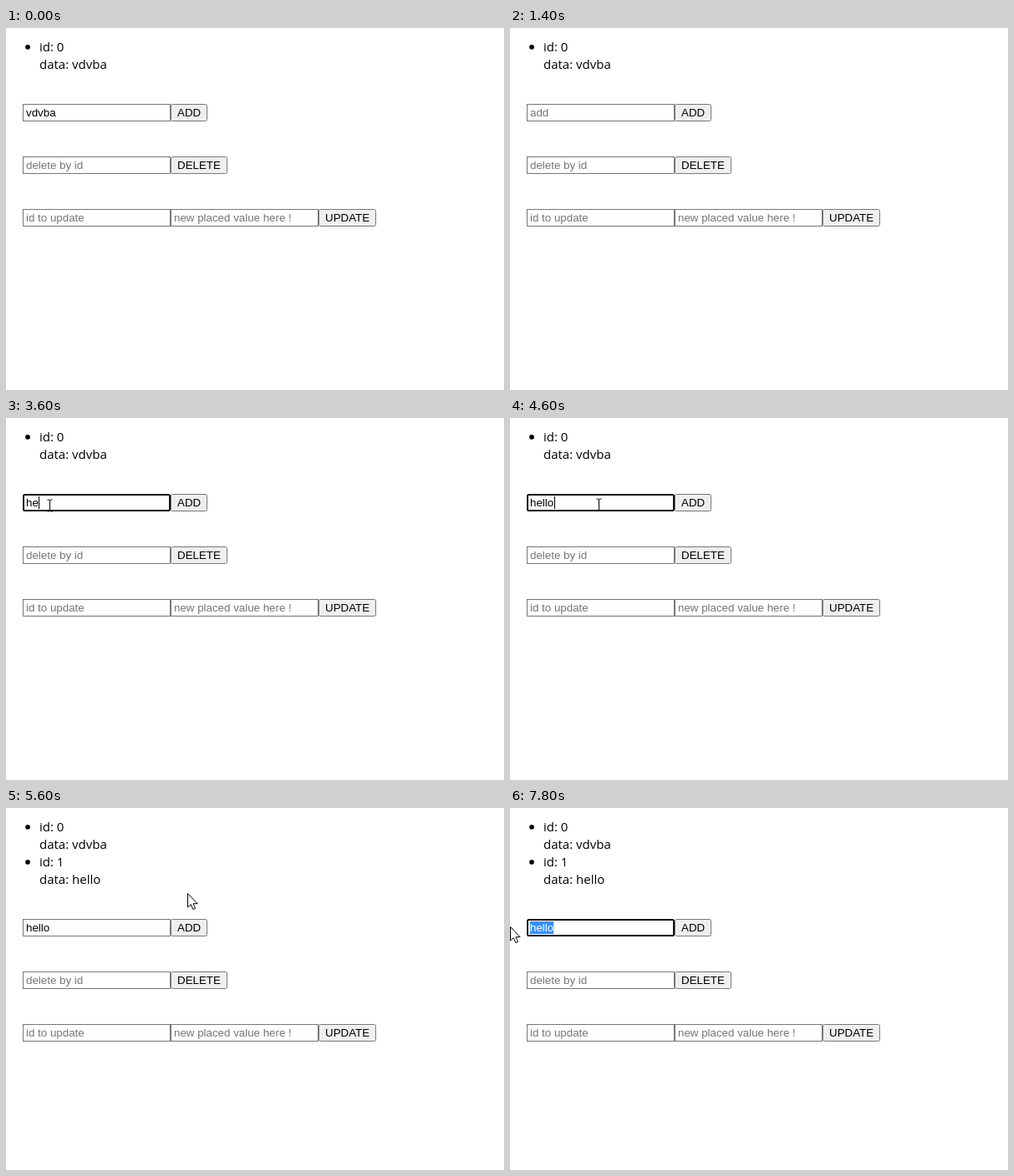
These frames come from a looping animation (596 px wide and 434 px high, 8 s). An HTML page:

```html
<!DOCTYPE html>
<html lang="en">
<head>
<meta charset="utf-8">
<title>List form</title>
<style>
  html, body { margin: 0; width: 100%; height: 100%; overflow: hidden; background: #fff; }
  svg { display: block; }
  text { white-space: pre; }
  .item { font: 15px "Open Sans", sans-serif; }
  .control { font: 13.3333px "Liberation Sans", Arial, sans-serif; }
</style>
</head>
<body>
<svg id="stage" width="596" height="434" viewBox="0 0 596 434"></svg>
<script>
const LOOP = 8000, STEP = 200;
const ADDED = 5600, ROW_SHIFT = 42, TEXT_X = 24;
const WORD = "hello", WORD_EDGES = [0, 7.4, 14.8, 17.8, 20.8, 28.2];

// Pointer stops: time, x, y
const POINTER = [
  [2000, 52.5, 104], [4400, 52.5, 104], [5000, 214.5, 102], [5200, 217.5, 102],
  [6200, 217.5, 102], [6600, 120, 143], [6800, 58, 143], [7200, 0.5, 142.5], [LOOP, 0.5, 142.5]
];
const ARROW = "M0 0V16.5L3.8 13L6.3 19L9 17.9L6.6 12.2H11.6Z";
const BEAM = "M-3 -6.5h2l1 1 1 -1h2M0 -5.5v12M-3 7.5h2l1 -1 1 1h2";

function pointerAt(t) {
  const i = POINTER.findIndex(stop => stop[0] > t);
  if (i < 1) return null;
  const [t0, x0, y0] = POINTER[i - 1], [t1, x1, y1] = POINTER[i];
  const k = (t - t0) / (t1 - t0);
  return { x: x0 + (x1 - x0) * k, y: y0 + (y1 - y0) * k };
}

function typedText(t) {
  if (t < 1400) return "vdvba";
  return WORD.slice(0, Math.max(0, Math.floor((t - 3200) / STEP)));
}

const inside = (p, x, y, w) => p && p.x >= x && p.x < x + w && p.y >= y && p.y < y + 21;

const label = (x, y, text, fill = "#000", kind = "control") =>
  `<text class="${kind}" x="${x}" y="${y}" fill="${fill}">${text}</text>`;

const item = (y, id, data) =>
  `<circle cx="26" cy="${y - 5.2}" r="2.9"/>` +
  label(40, y, `id: ${id}`, "#000", "item") + label(40, y + 21, `data: ${data}`, "#000", "item");

function field(x, y, placeholder, value = "", focused = false) {
  const border = focused
    ? `<rect x="${x + 1}" y="${y + 1}" width="175" height="19" rx="1.5" fill="#fff" stroke="#101010" stroke-width="2"/>`
    : `<rect x="${x + .5}" y="${y + .5}" width="176" height="20" fill="#fff" stroke="#767676"/>`;
  return border + label(x + 4, y + 15, value || placeholder, value ? "#000" : "#757575");
}

const button = (x, y, w, text, hover = false) =>
  `<rect x="${x + .5}" y="${y + .5}" width="${w - 1}" height="20" rx="2"
    fill="${hover ? "#e5e5e5" : "#efefef"}" stroke="${hover ? "#4f4f4f" : "#767676"}"/>` +
  label(x + 8, y + 15, text);

function selection(y, start) {
  const x = TEXT_X + WORD_EDGES[start];
  return `<rect x="${x}" y="${y + 3}" width="${WORD_EDGES[5] - WORD_EDGES[start]}" height="15" fill="#3390ff"/>` +
    label(x, y + 15, WORD.slice(start), "#fff");
}

function caret(t, y, length) {
  const since = t < 3400 ? 2200 : t < 4400 ? t : t < 6800 ? 4200 : 6800;
  if (Math.floor((t - since) / 500) % 2) return "";
  const x = Math.floor(TEXT_X + WORD_EDGES[length]) + (length ? 1 : 0);
  return `<rect x="${x}" y="${y + 3}" width="1" height="15"/>`;
}

function drawPointer(p, overField) {
  const style = overField ? 'fill="none"' : 'fill="#fff"';
  const x = Math.floor(p.x) + .5, y = Math.floor(p.y) + .5;
  return `<path transform="translate(${x} ${y})" d="${overField ? BEAM : ARROW}" ${style} stroke="#000"/>`;
}

function scene(t) {
  const added = t >= ADDED, y = 91 + (added ? ROW_SHIFT : 0);
  const pointer = pointerAt(t), value = typedText(t);
  const focused = (t >= 2200 && t < 5200) || t >= 6800;

  let out = item(28, 0, "vdvba");
  if (added) out += item(70, 1, WORD);
  out += field(20, y, "add", value, focused) +
    button(197, y, 44, "ADD", inside(pointer, 197, y, 44)) +
    field(20, y + 63, "delete by id") + button(197, y + 63, 68, "DELETE") +
    field(20, y + 126, "id to update") + field(197, y + 126, "new placed value here !") +
    button(374, y + 126, 69, "UPDATE");

  if (focused) {
    const hit = t < 6800 ? -1 : WORD_EDGES.findIndex(edge => TEXT_X + edge >= pointer.x - 3);
    out += hit >= 0 && hit < WORD.length ? selection(y, hit) : caret(t, y, value.length);
  }
  if (pointer) out += drawPointer(pointer, inside(pointer, 20, y, 177));
  return out;
}

const stage = document.getElementById("stage");
let shown = -1;
function tick() {
  const t = Math.floor(performance.now() % LOOP / STEP) * STEP;
  if (t !== shown) stage.innerHTML = scene(shown = t);
  requestAnimationFrame(tick);
}
tick();
</script>
</body>
</html>
```
